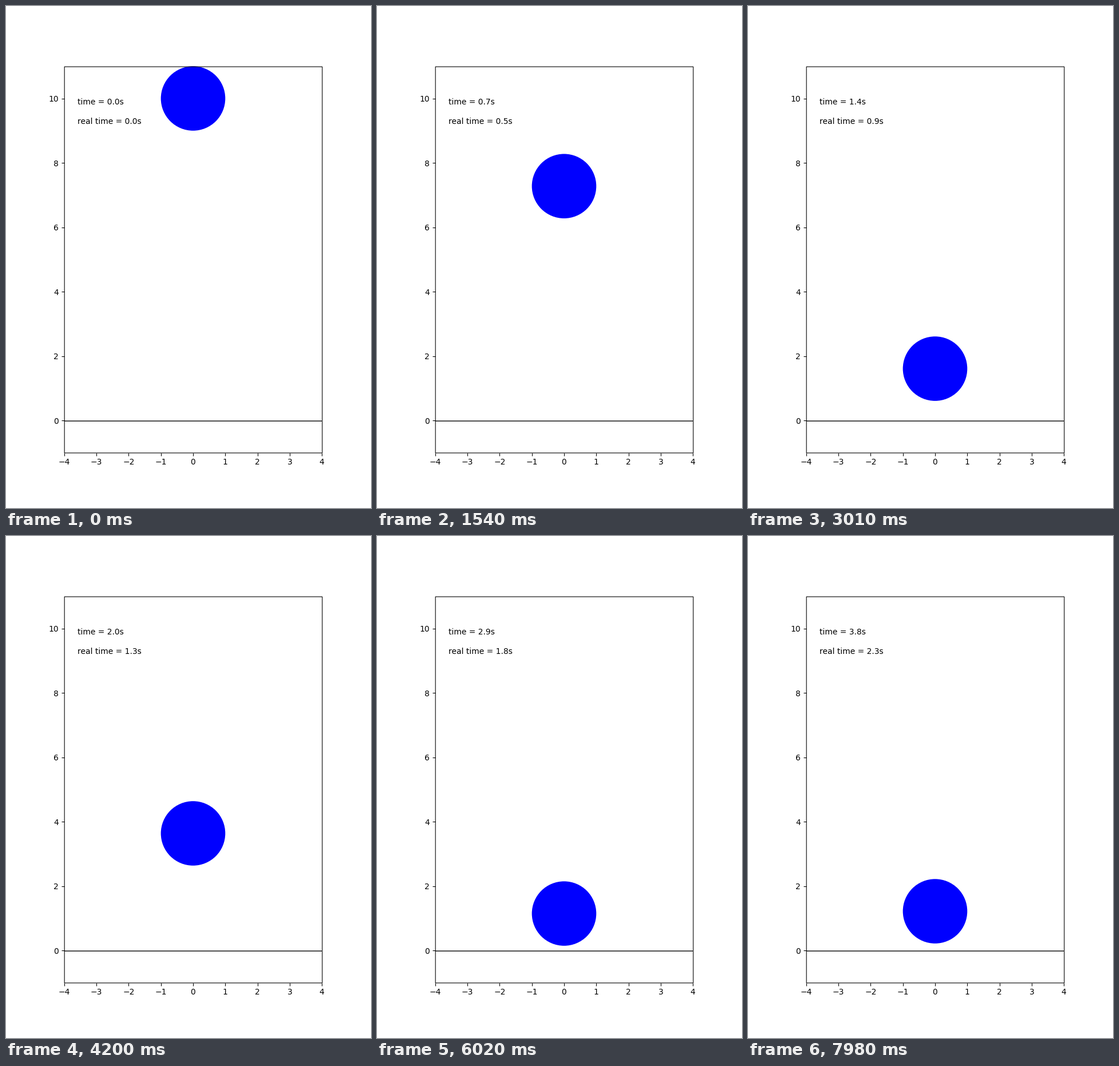
Write a matplotlib script that moves like this. It is 638 by 877 pixels and loops after 8 s.

```python
import math

import matplotlib.pyplot as plt
from matplotlib.animation import FuncAnimation

W, H, DPI = 638, 877, 100
STAGE_MS, STEP_MS, LOOP_MS = 70, 40, 8000

# The plot is laid out on a 640 x 880 grid and shrunk a little to the stage.
GRID_W, GRID_H = 640, 880
SHRINK = W / GRID_W
UNIT = 0.77 * GRID_H / 12
X0 = 0.5125 * GRID_W
Y0 = 0.89 * GRID_H - UNIT

GRAVITY = 9.81
RADIUS = 1.0
START = 10.0
BOUNCE = 0.55          # share of speed kept at each bounce
DT = 0.01              # physics step in seconds
FPS = 30


def simulate(count):
    """Height of the ball and elapsed time for each picture."""
    t, target, y, v = 0.0, 0.0, START, 0.0
    states = [(t, y)]
    for _ in range(count - 1):
        target += 1 / FPS
        # both clocks accumulate, so a step may fall on either side
        while t < target:
            v -= GRAVITY * DT
            y += v * DT
            if y < RADIUS:
                y = RADIUS
                v *= -BOUNCE
            t += DT
        states.append((t, y))
    return states


def wall_clock(n):
    return 0.045 + 0.0201 * n


def on_grid(x, y, offset=0.5):
    """Move a data point to the nearest grid cell."""
    col = math.floor(X0 + UNIT * x + 0.5) + offset
    row = math.floor(Y0 - UNIT * y + 0.5) + offset
    return (col - X0) / UNIT, (Y0 - row) / UNIT


def label(x, y):
    return ax.text(*on_grid(x, y, 0), "", family="DejaVu Sans", size=10 * SHRINK)


states = simulate(LOOP_MS // STAGE_MS + 1)

fig = plt.figure(figsize=(W / DPI, H / DPI), dpi=DPI, facecolor="white")
ax = fig.add_axes([(X0 - 4 * UNIT) / GRID_W, 0.11, 8 * UNIT / GRID_W, 0.77])
ax.set_xlim(-4, 4)
ax.set_ylim(-1, 11)
ax.set_xticks(range(-4, 5))
ax.set_yticks(range(0, 11, 2))
ax.tick_params(labelsize=10 * SHRINK)
ax.spines[:].set_visible(False)

left, bottom = on_grid(-4, -1)
right, top = on_grid(4, 11)
floor = on_grid(0, 0)[1]
ax.add_patch(plt.Rectangle((left, bottom), right - left, top - bottom,
                           fill=False, ec="black", lw=0.8 * SHRINK,
                           zorder=2.5, clip_on=False, snap=False))
ax.plot([left, right], [floor, floor], color="black", lw=SHRINK, snap=False)

ball = plt.Circle((0, START), RADIUS, fc="blue")
ax.add_patch(ball)
time_label = label(-3.6, 9.8)
real_label = label(-3.6, 9.2)


def draw(i):
    n = (i * STEP_MS + STEP_MS - 10) // STAGE_MS
    t, y = states[n]
    ball.center = (0, y)
    time_label.set_text(f"time = {t:.1f}s")
    real_label.set_text(f"real time = {wall_clock(n):.1f}s")
    return ball, time_label, real_label


def reset():
    return draw(0)


anim = FuncAnimation(fig, draw, frames=LOOP_MS // STEP_MS, init_func=reset,
                     interval=STEP_MS, repeat=True, repeat_delay=0)

plt.show()
```
